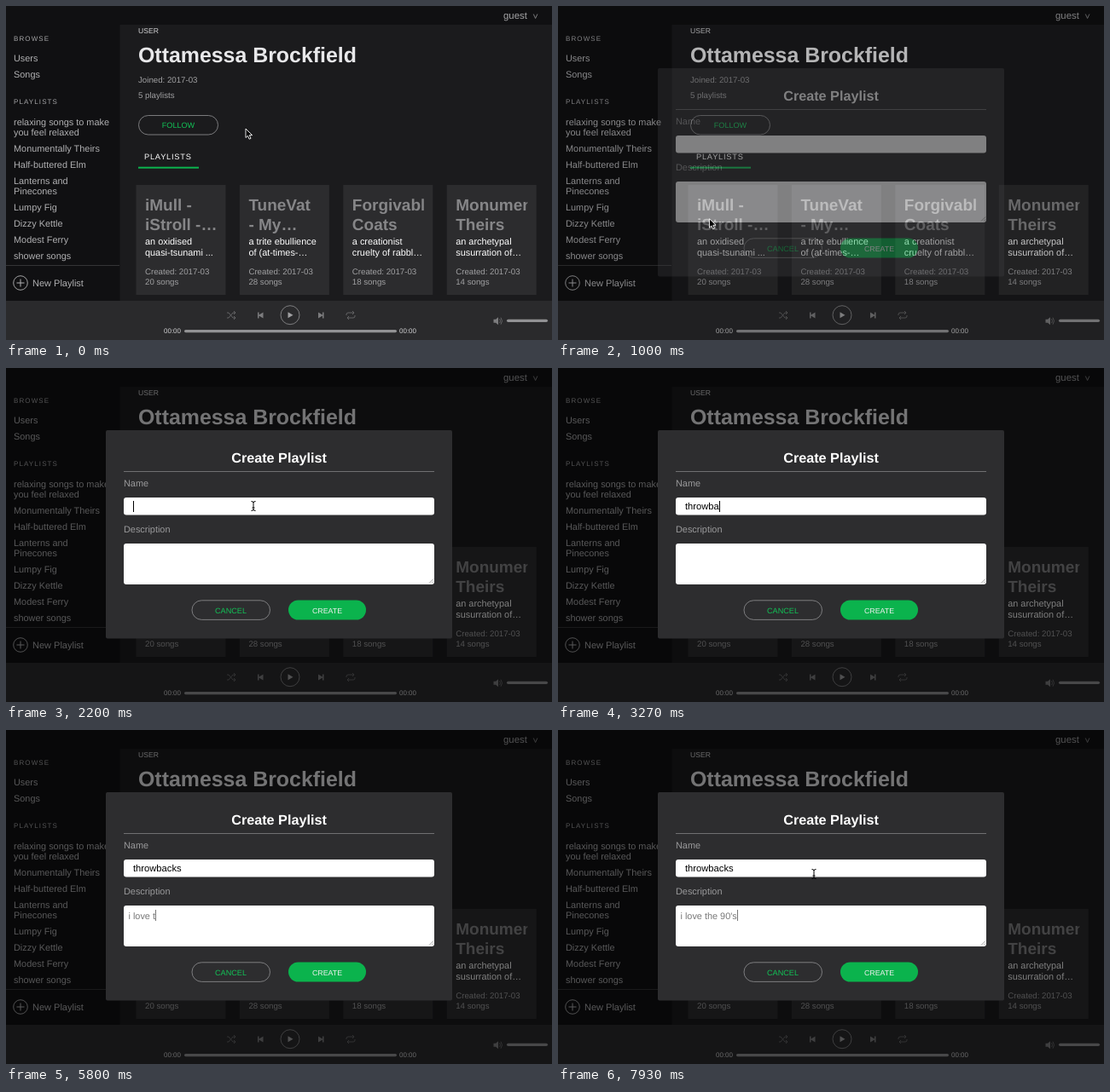
Animation of 640 by 392 pixels, one loop 8 s. Source, as an HTML page:

```html
<!DOCTYPE html>
<html lang="en">
<head>
<meta charset="utf-8">
<title>Create Playlist</title>
<style>
  html, body { margin: 0; height: 100%; overflow: hidden; background: #101012; }
  svg { display: block; width: 100vw; height: 100vh; }
  text {
    font: 10.9px "Liberation Sans", Helvetica, Arial, sans-serif; fill: #b0b0b2;
    white-space: pre; text-rendering: geometricPrecision;
  }
  .head { font-size: 8px; letter-spacing: 1.1px; fill: #a4a4a6; }
  .small { font-size: 9.7px; fill: #a0a0a2; }
  .time { font-size: 8px; fill: #d0d0d2; }
  .cardTitle { font-size: 19px; font-weight: bold; fill: #868688; }
  .button { font-size: 9.1px; text-anchor: middle; }
  .white { fill: #fff; }
  .green { fill: #0bb34d; }
  text.green { fill: #12c457; }
  .line { fill: none; stroke: #868688; stroke-width: .9; }
  .icon { fill: #7c7c7e; }
  .iconLine { fill: none; stroke: #6a6a6c; stroke-width: .9; }
</style>
</head>
<body>
<svg viewBox="0 0 640 392">
  <defs>
    <clipPath id="cardClip"><rect x="10" width="84.5" height="129"/></clipPath>
  </defs>

  <rect width="640" height="392" fill="#101012"/>
  <rect x="133.500" y="22" width="506.500" height="324" fill="#1b1b1d"/>

  <text x="583" y="15" style="font-size:11.4px;fill:#a4a4a6">guest</text>
  <path class="line" d="M618.300 9.500l2.300 5 2.300-5"/>

  <text class="head" x="9" y="40.500">BROWSE</text>
  <text class="head" x="9" y="115.300">PLAYLISTS</text>
  <g id="sidebar"></g>
  <path d="M0 304.500H133" stroke="#343436"/>
  <g id="newPlaylist" fill="#b0b0b2" stroke="#b0b0b2">
    <circle cx="17" cy="325" r="8.300" fill="none" stroke-width=".9"/>
    <path d="M12.500 325h9M17 320.500v9"/>
    <text x="31" y="329" stroke="none" style="font-size:11px;fill:inherit">New Playlist</text>
  </g>

  <text x="155" y="32" style="font-size:8.600px;fill:#d4d4d6">USER</text>
  <text x="155" y="66" style="font-size:24.900px;font-weight:bold;fill:#e8e8ea">Ottamessa Brockfield</text>
  <text class="small" x="155" y="89.700">Joined: 2017-03</text>
  <text class="small" x="155" y="108.300">5 playlists</text>
  <rect class="line" x="155.500" y="128.500" width="93" height="22.500" rx="11.200"/>
  <text class="button green" x="202" y="143.200">FOLLOW</text>
  <text class="white" x="162" y="180.300" style="font-size:9.300px;letter-spacing:.75px">PLAYLISTS</text>
  <rect class="green" x="155" y="188.700" width="71" height="2"/>
  <g id="cards"></g>

  <rect y="346" width="640" height="46" fill="#2a2a2c"/>
  <g class="iconLine">
    <path d="M259 360h2l5 6h3M259 366h2l5-6h3M267 358l2 2-2 2M267 364l2 2-2 2"/>
    <path d="M399 363v-1q0-2 2-2h7M406 358l2 2-2 2M409 363v1q0 2-2 2h-7M402 364l-2 2 2 2"/>
  </g>
  <path class="icon" d="M295 359.500h1.500v3l5-3v7l-5-3v3h-1.500zM372.500 359.500h-1.500v3l-5-3v7l5-3v3h1.500z"/>
  <circle class="line" cx="333" cy="362.700" r="11"/>
  <path d="M330.500 359.200l6 3.500-6 3.500z" fill="#a0a0a2"/>
  <text class="time" x="185" y="384.400">00:00</text>
  <text class="time" x="461" y="384.400">00:00</text>
  <rect x="209" y="380" width="249" height="3.200" rx="1.600" fill="#929294"/>
  <path class="icon" d="M571.500 367.700h2.500l3-2.500v9l-3-2.500h-2.500z"/>
  <path class="iconLine" d="M578.500 367.200q2 2.500 0 5M580 365.700q3 4 0 8"/>
  <rect x="587" y="367.700" width="48" height="3.200" rx="1.600" fill="#929294"/>

  <g id="modal">
    <rect width="640" height="392" opacity=".5"/>
    <rect x="117" y="73" width="406" height="244.500" rx="2" fill="#2d2d2f"/>
    <text class="white" x="320" y="110.500" text-anchor="middle" style="font-size:16.200px;font-weight:bold">Create Playlist</text>
    <path d="M138 121.500H502" stroke="#707072"/>
    <text x="138" y="139" style="fill:#9a9a9c">Name</text>
    <rect class="white" x="138" y="152" width="364" height="20.500" rx="3"/>
    <text id="name" x="149" y="166" style="font-size:11.200px;fill:#000"></text>
    <text x="138" y="193" style="fill:#9a9a9c">Description</text>
    <rect class="white" x="138" y="206" width="364" height="48" rx="3"/>
    <path d="M496 252.500l5-5M499 252.500l2-2" stroke="#888" stroke-width=".8"/>
    <text id="description" x="143.500" y="221.700" style="fill:#777"></text>
    <rect id="caret" width="1" height="13"/>
    <rect class="line" x="218" y="272.800" width="91.500" height="22.600" rx="11.300"/>
    <text class="button green" x="263.500" y="287.700">CANCEL</text>
    <rect class="green" x="331" y="272.500" width="91" height="23" rx="11.500"/>
    <text class="button" x="376.500" y="287.700" style="fill:#f0f0f0;font-size:8.800px">CREATE</text>
  </g>

  <g id="cursor" stroke-linejoin="round">
    <path id="arrow" d="M0 0v10.500l2.400-2.200 1.700 3.900 1.900-.8-1.700-3.800h3.300z" fill="#000" stroke="#fff" stroke-width=".9"/>
    <path id="hand" d="M-1 1q1-1.500 2 0v3.500l4 1q1 .5 .7 2l-1 3.500h-5l-3.500-4.500q0-1.500 2.800 .3z" fill="#fff" stroke="#000" stroke-width=".7"/>
    <path id="beam" d="M-2.500-5.500q2.500 0 2.500 1.500q0-1.500 2.500-1.500M0-4.500v9M-2.500 5.500q2.500 0 2.500-1.500q0 1.500 2.500 1.500M-1.500 2h3" fill="none" stroke="#000"/>
  </g>
</svg>

<script>
const LOOP = 8000;
const el = id => document.getElementById(id);
const show = (node, on) => node.setAttribute('visibility', on ? 'visible' : 'hidden');
const clamp = v => Math.max(0, Math.min(1, v));

const sidebar = [
  [65, 'Users'], [84, 'Songs'],
  [139.5, 'relaxing songs to make'], [152, 'you feel relaxed'],
  [171, 'Monumentally Theirs'], [190, 'Half-buttered Elm'],
  [209, 'Lanterns and'], [221, 'Pinecones'], [240, 'Lumpy Fig'],
  [259, 'Dizzy Kettle'], [278, 'Modest Ferry'], [297, 'shower songs'],
];
el('sidebar').innerHTML = sidebar.map(([y, label]) => `<text x="9" y="${y}">${label}</text>`).join('');

const cards = [
  ['iMull -', 'iStroll -…', 'an oxidised', 'quasi-tsunami ...', 20],
  ['TuneVat', '- My…', 'a trite ebullience', 'of (at-times-…', 28],
  ['Forgivable', 'Coats', 'a creationist', 'cruelty of rabbl…', 18],
  ['Monumentally', 'Theirs', 'an archetypal', 'susurration of…', 14],
];
el('cards').innerHTML = cards.map(([title, title2, line, line2, songs], i) => `
  <g transform="translate(${152.5 + i * 121.4} 210)">
    <rect width="105" height="129" fill="#2c2c2e"/>
    <g clip-path="url(#cardClip)">
      <text class="cardTitle" x="10.5" y="29.5">${title}</text>
      <text class="cardTitle" x="10.5" y="52.5">${title2}</text>
      <text class="white" x="10.5" y="70">${line}</text>
      <text class="white" x="10.5" y="82.5">${line2}</text>
      <text class="small" x="10.5" y="105.3">Created: 2017-03</text>
      <text class="small" x="10.5" y="116.5">${songs} songs</text>
    </g>
  </g>`).join('');

const steps = (start, gap, count) => Array.from({ length: count }, (_, i) => start + gap * i);
const fields = [
  { node: el('name'), text: 'throwbacks', keys: steps(2330, 144, 10), focus: 1800, blur: 4200, y: 156, color: '#000' },
  { node: el('description'), text: "i love the 90's", keys: [...steps(4700, 155, 10), ...steps(6340, 127, 5)],
    focus: 4200, blur: LOOP, y: 211, color: '#777' },
];

// time, x, y
const track = [[0, 281, 144], [70, 281, 144], [410, 99, 320], [880, 99, 320], [1000, 177, 250], [1250, 290, 162], [LOOP, 290, 162]];

function pointer(t) {
  if (t > 7860) return [300, 169];
  const i = track.findIndex(p => p[0] > t);
  const [t0, x0, y0] = track[i - 1], [t1, x1, y1] = track[i];
  const k = (t - t0) / (t1 - t0);
  return [x0 + (x1 - x0) * k, y0 + (y1 - y0) * k];
}

function drawFields(t) {
  let caretOn = false;
  for (const f of fields) {
    const typed = f.keys.filter(k => k <= t);
    f.node.textContent = f.text.slice(0, typed.length);
    if (t < f.focus || t >= f.blur) continue;
    const since = t - (typed.at(-1) ?? f.focus);
    caretOn = since % 1000 < 530;
    const caret = el('caret');
    const width = typed.length ? f.node.getComputedTextLength() : 0;
    caret.setAttribute('x', Math.round(+f.node.getAttribute('x') + width));
    caret.setAttribute('y', f.y);
    caret.setAttribute('fill', f.color);
  }
  show(el('caret'), caretOn);
}

function drawPointer(t) {
  const [x, y] = pointer(t);
  const hover = t < 930 && x < 125 && y > 306;
  const beam = t > 1200;
  el('cursor').setAttribute('transform', `translate(${x} ${y})`);
  show(el('arrow'), !hover && !beam);
  show(el('hand'), hover);
  show(el('beam'), beam && (t < 2330 || t > 7860));
  const color = hover ? '#fff' : '#b0b0b2';
  el('newPlaylist').setAttribute('fill', color);
  el('newPlaylist').setAttribute('stroke', color);
}

function frame(now) {
  const t = now % LOOP;
  const fade = clamp((t - 890) / 250);
  el('modal').setAttribute('opacity', fade);
  drawFields(t);
  drawPointer(t);
  requestAnimationFrame(frame);
}
requestAnimationFrame(frame);
</script>
</body>
</html>
```
